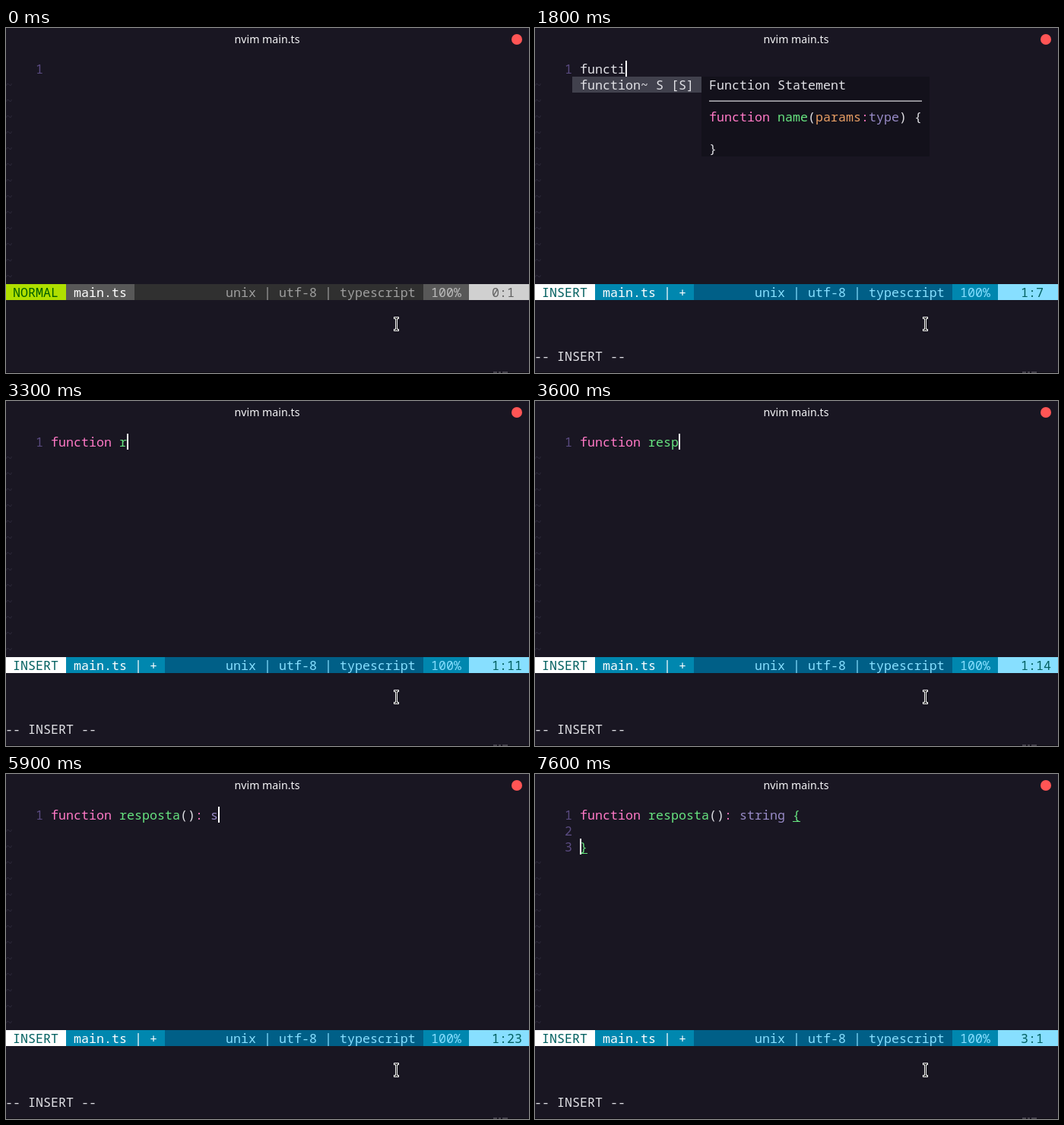
Write an HTML page that moves like this. It is 688 by 454 pixels and loops after 8000 ms.

```html
<!DOCTYPE html>
<html lang="en">
<head>
<meta charset="utf-8">
<title>nvim main.ts</title>
<style>
  html, body { margin: 0; width: 100%; height: 100%; overflow: hidden; background: #191622; }
  svg { display: block; width: 688px; height: 454px; }
  text { font: 16.667px "Noto Sans Mono", monospace; font-variant-ligatures: none; white-space: pre; }
  .title { font: 500 14.2px "Noto Sans", sans-serif; }
</style>
</head>
<body>
<svg viewBox="0 0 688 454" xmlns="http://www.w3.org/2000/svg">
  <rect width="688" height="454" fill="#191622"/>
  <text class="title" x="343.5" y="20" text-anchor="middle" fill="#f4f4f6">nvim main.ts</text>
  <circle cx="672" cy="15" r="7" fill="#ff5555"/>
  <g id="screen"></g>
  <g fill="none">
    <path d="M510 381.5h7M510 397.5h7M513.5 381v17" stroke="#fff" stroke-width="3"/>
    <path d="M511 381.5h5M511 397.5h5M513.5 382v15" stroke="#111" stroke-width="1"/>
  </g>
  <rect y="453" width="688" height="1" fill="#0d0b13"/>
  <path d="M641 453h5M648 453h3M653 453h7" stroke="#55535c" stroke-width="1.5"/>
</svg>
<script>
const LOOP = 8000, CELL = 10, ROW = 21, LEFT = -1, TOP = 43;
const FG = '#e1e1e6', PINK = '#ff79c6', GREEN = '#67e480', PURPLE = '#988bc7', ORANGE = '#e89e64';
const MENU = '#13111b', SELECTED = '#41414d', NUMBER = '#5a4b81', TILDE = '#2b2838';

const CODE = 'function resposta(): string {';
const TOKENS = [[0, 8, PINK], [9, 17, GREEN], [17, 19, FG], [19, 20, PINK], [21, 27, PURPLE], [28, 29, GREEN]];

const THEMES = {
  NORMAL: { mode: ['#afdf00', '#005f00'], file: ['#585858', '#fff'], mid: ['#303030', '#9e9e9e'],
            percent: ['#585858', '#bcbcbc'], pos: ['#d0d0d0', '#606060'] },
  INSERT: { mode: ['#fff', '#005f5f'], file: ['#0087af', '#fff'], mid: ['#005f87', '#87dfff'],
            percent: ['#0087af', '#87dfff'], pos: ['#87dfff', '#005f5f'] }
};

const SHORT_LIST = ['string k', 'symbol k', 'Set v', 'Screen v', 'String v', 'Symbol v',
  'Storage v', 'Selection v', 'StyleSheet v', 'SubmitEvent v'];
const LONG_LIST = ['string k', 'String v', 'StringConstructor I', 'StringDecoder C',
  'StringifyOptions I', 'TemplateStringsArray I', 'FunctionStringCallback I', 'SVGStringList v',
  'SVGAnimatedString v', 'SpawnSyncOptionsWithStringEncoding I'];

// Start time, characters typed, options
const STEPS = [
  [0, 0, { mode: 'NORMAL', blink: true }],
  [400, 0, { mode: 'NORMAL', message: true }],
  [500, 0],
  [900, 0, { blink: true }],
  [1200, 1, { saved: true }],
  [1300, 1],
  [1500, 3],
  [1700, 4],
  [1800, 6, { menu: snippetMenu }],
  [1900, 7, { menu: snippetMenu }],
  [2000, 8, { menu: snippetMenu }],
  [2100, 9],
  [2600, 9, { blink: true }],
  [3100, 9],
  [3300, 10],
  [3500, 12],
  [3600, 13],
  [3700, 14],
  [3900, 15],
  [4100, 17],
  [4700, 17, { blink: true }],
  [4800, 18, { tail: ')' }],
  [5100, 19],
  [5500, 20],
  [5700, 21],
  [5900, 22],
  [6100, 22, { menu: () => listMenu(SHORT_LIST) }],
  [6300, 23, { menu: () => listMenu(SHORT_LIST) }],
  [6400, 25, { menu: () => listMenu(LONG_LIST) }],
  [6500, 27, { menu: () => listMenu(LONG_LIST) }],
  [7000, 28],
  [7200, 29, { tail: '}' }],
  [7500, 29, { lines: 2 }],
  [7600, 29, { lines: 3 }]
];

const x = col => LEFT + col * CELL;
const y = row => TOP + row * ROW;

function box(col, row, cols, rows, fill) {
  return `<rect x="${x(col)}" y="${y(row)}" width="${cols * CELL}" height="${rows * ROW}" fill="${fill}"/>`;
}

function put(col, row, str, fill = FG) {
  return `<text x="${x(col)}" y="${y(row) + 17}" fill="${fill}">${str}</text>`;
}

function bracket(col, row, char) {
  return put(col, row, char, GREEN) +
    `<rect x="${x(col)}" y="${y(row) + 19}" width="${CELL}" height="1" fill="${GREEN}"/>`;
}

function cursor(col, row) {
  return `<rect x="${x(col)}" y="${y(row)}" width="2" height="${ROW}" fill="#fff"/>`;
}

function snippetMenu() {
  const parts = [['function', PINK], [' '], ['name', GREEN], ['('], ['params', ORANGE],
    [':', PINK], ['type', PURPLE], [') {']];
  let col = 23;
  let out = box(5, 1, 17, 1, SELECTED) + put(6, 1, 'function~ S [S]') +
    box(22, 1, 30, 5, MENU) + put(23, 1, 'Function Statement') +
    `<rect x="${x(23)}" y="95.5" width="${28 * CELL}" height="1.2" fill="${FG}"/>`;
  for (const [str, fill] of parts) {
    out += put(col, 3, str, fill);
    col += str.length;
  }
  return out + put(23, 5, '}');
}

function listMenu(list) {
  const items = list.map(item => item.split(' '));
  const width = Math.max(...items.map(([name]) => name.length));
  return box(26, 1, width + 10, items.length, MENU) + box(26, 1, width + 10, 1, SELECTED) +
    items.map(([name, kind], i) =>
      put(27, i + 1, name) + put(28 + width, i + 1, kind + ' [TSC]')).join('');
}

function codeLine(typed, tail) {
  let out = '';
  for (const [from, to, color] of TOKENS) {
    if (typed <= from) break;
    const fill = from === 0 && typed < to ? FG : color;
    const str = CODE.slice(from, Math.min(to, typed));
    const matched = from === 28 || (from === 17 && typed < 20);
    out += matched
      ? [...str].map((char, i) => bracket(6 + from + i, 0, char)).join('')
      : put(6 + from, 0, str, fill);
  }
  return tail ? out + bracket(6 + typed, 0, tail) : out;
}

function statusLine(mode, file, pos) {
  const theme = THEMES[mode];
  const part = (col, cols, [bg, fg], str, textCol = col + 1) =>
    box(col, 14, cols, 1, bg) + put(textCol, 14, str, fg);
  return part(17, 38, theme.mid, 'unix | utf-8 | typescript', 29) +
    part(0, 8, theme.mode, mode) +
    part(8, file.length + 2, theme.file, file) +
    part(55, 6, theme.percent, '100%') +
    part(61, 8, theme.pos, pos, 64);
}

function render([, typed, options = {}]) {
  const { mode = 'INSERT', message = mode === 'INSERT', blink, saved, menu, tail, lines = 1 } = options;
  const file = typed && !saved ? 'main.ts | +' : 'main.ts';
  const pos = lines > 1 ? lines + ':1' : (typed ? 1 : 0) + ':' + (typed + 1);
  let out = '';
  for (let row = 0; row < 14; row++) {
    out += row < lines ? put(4, row, row + 1, NUMBER) : put(0, row, '~', TILDE);
  }
  out += codeLine(typed, tail);
  if (lines > 1) out += bracket(6, lines - 1, '}');
  if (menu) out += menu();
  if (!blink) out += lines > 1 ? cursor(6, lines - 1) : cursor(6 + typed, 0);
  out += statusLine(mode, file, pos);
  if (message) out += put(0, 18, '-- INSERT --');
  return out;
}

const screen = document.getElementById('screen');
const start = performance.now();
let shown;

function tick() {
  const time = (performance.now() - start) % LOOP;
  const step = STEPS.findLast(([from]) => from <= time);
  if (step !== shown) {
    screen.innerHTML = render(step);
    shown = step;
  }
  requestAnimationFrame(tick);
}
tick();
</script>
</body>
</html>
```
